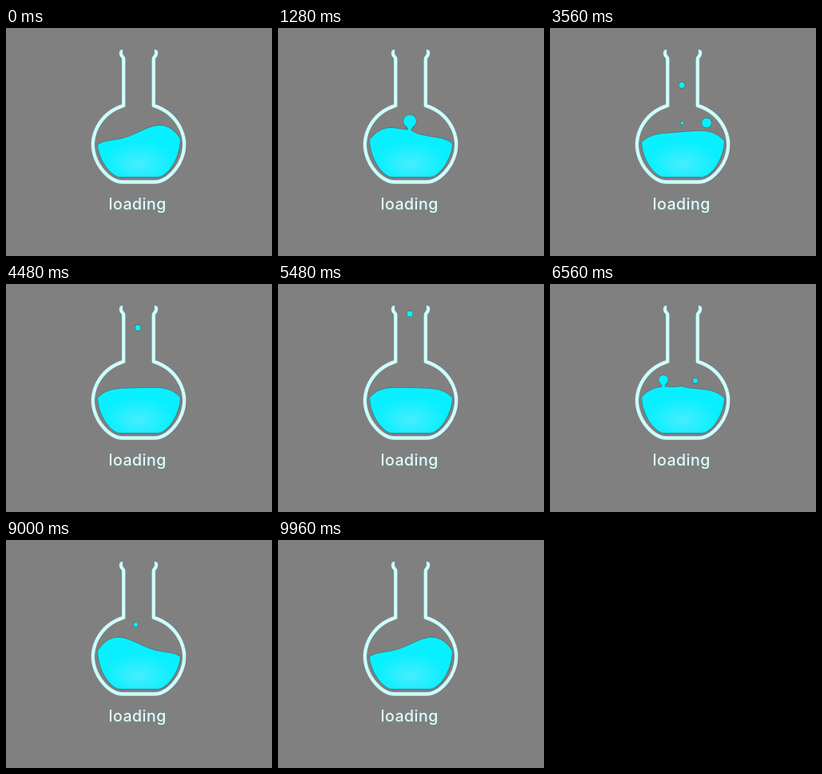
Write an HTML page with a canvas that moves like this. It is 333x285 px and loops after 10 s.

```html
<!DOCTYPE html>
<html lang="en">
<head>
<meta charset="utf-8">
<title>Loading</title>
<style>
html, body { margin: 0; width: 100%; height: 100%; overflow: hidden; background: #808080; }
canvas { display: block; }
</style>
</head>
<body>
<canvas id="stage" width="333" height="285"></canvas>
<script>
const ctx = document.getElementById('stage').getContext('2d');
const LOOP = 10;
const WAVE_PERIOD = 2;
const LEFT = 115, RIGHT = 218, MIDDLE = 166.5;

// x, radius, start time (s), rise speed, lifetime (s)
const bubbles = [
  [165, 3.5, 0.85, 30.5, 5.2],
  [165, 8, 0.89, 45, 2.5],
  [139, 5, 2.19, 30, 1.2],
  [196, 6, 2.98, 30, 1.4],
  [165.5, 3.5, 3.0, 30, 0.78],
  [142, 5.8, 6.03, 30, 1.3],
  [182, 3, 6.07, 30, 1.3],
  [165, 4, 6.43, 30, 1.2],
  [141, 3.5, 7.55, 28.5, 1.3],
  [162.5, 5, 7.91, 30, 1.3]
].map(([x, r, start, speed, life]) => ({ x, r, start, speed, life }));

const glow = ctx.createRadialGradient(0, 0, 0, 0, 0, 1);
glow.addColorStop(0, 'rgba(70, 236, 255, 1)');
glow.addColorStop(1, 'rgba(70, 236, 255, 0)');

function liveBubbles(time) {
  return bubbles.flatMap(b => {
    const age = time - b.start;
    if (age <= 0 || age >= b.life) return [];
    const scale = Math.min(1, (b.life - age) / 0.4);
    return [{ x: b.x, y: 138 - b.speed * age ** 0.78, r: b.r * scale, age }];
  });
}

function surfaceY(x, tilt, live) {
  const u = x - MIDDLE;
  const level = 130 + 12 * (Math.abs(u) / 51.5) ** 4.5;
  let y = level - 8.8 * tilt * Math.sin(Math.PI * u / 60);
  for (const b of live) {
    const pull = Math.max(0, 1 - b.age / 0.6) * Math.min(1, b.age / 0.1);
    y -= 0.45 * b.r * pull * Math.exp(-(((x - b.x) / 7) ** 2));
  }
  return y;
}

function liquidPath(tilt, live) {
  const path = new Path2D();
  const leftY = surfaceY(LEFT, tilt, live);
  path.moveTo(LEFT, leftY);
  for (let x = LEFT + 1; x <= RIGHT; x++) path.lineTo(x, surfaceY(x, tilt, live));
  path.bezierCurveTo(RIGHT, 161, 203, 186, 190, 186);
  path.lineTo(143, 186);
  path.bezierCurveTo(130, 186, LEFT, 161, LEFT, leftY);
  path.closePath();
  return path;
}

function bubblePath(b) {
  const path = new Path2D();
  path.arc(b.x, b.y, b.r, 0, 2 * Math.PI);
  return path;
}

// Thread that still ties a large young bubble to the liquid
function tailPath(b, tilt, live) {
  const path = new Path2D();
  const base = surfaceY(b.x, tilt, live) + 1;
  const top = b.y + b.r * 0.65;
  const half = b.r * 0.75;
  path.moveTo(b.x - half, top);
  path.quadraticCurveTo(b.x - 0.5, (top + base) / 2, b.x - 2.5, base);
  path.lineTo(b.x + 2.5, base);
  path.quadraticCurveTo(b.x + 0.5, (top + base) / 2, b.x + half, top);
  path.closePath();
  return path;
}

function drawGlow(clipPath) {
  ctx.save();
  ctx.clip(clipPath);
  ctx.translate(MIDDLE, 169);
  ctx.scale(44, 27);
  ctx.fillStyle = glow;
  ctx.fillRect(-1, -1, 2, 2);
  ctx.restore();
}

function drawLiquid(time) {
  const tilt = Math.cos(2 * Math.PI * time / WAVE_PERIOD);
  const live = liveBubbles(time);
  const body = liquidPath(tilt, live);
  const shapes = [body, ...live.map(bubblePath)];
  for (const b of live) {
    if (b.r > 4 && b.age < 0.55) shapes.push(tailPath(b, tilt, live));
  }
  ctx.strokeStyle = 'rgba(0, 85, 95, 0.5)';
  ctx.lineWidth = 1.2;
  shapes.forEach(shape => ctx.stroke(shape));
  ctx.fillStyle = '#08f0ff';
  shapes.forEach(shape => ctx.fill(shape));
  drawGlow(body);
}

function drawFlaskHalf(side) {
  const angle = degrees => degrees * Math.PI / 180;
  ctx.save();
  ctx.translate(166, 0);
  ctx.scale(side, 1);
  ctx.beginPath();
  ctx.moveTo(-20, 29);
  ctx.bezierCurveTo(-23, 29, -22.5, 34, -20, 36);
  ctx.quadraticCurveTo(-18.8, 37, -18.8, 40);
  ctx.lineTo(-18.8, 97);
  ctx.ellipse(0, 146, 57, 52, 0, angle(250.8), angle(145), true);
  ctx.bezierCurveTo(-38.8, 186, -30, 192.5, -20, 192.5);
  ctx.lineTo(0.5, 192.5);
  ctx.stroke();
  ctx.restore();
}

function drawFlask() {
  ctx.strokeStyle = '#ccffff';
  ctx.lineWidth = 4.3;
  ctx.lineJoin = 'round';
  drawFlaskHalf(1);
  drawFlaskHalf(-1);
}

function drawLabel() {
  ctx.fillStyle = '#dcffff';
  ctx.font = '500 19.5px Inter, Lato, sans-serif';
  ctx.letterSpacing = '0.5px';
  ctx.fillText('loading', 128.5, 227);
}

function draw(now) {
  const time = now / 1000 % LOOP;
  ctx.fillStyle = '#808080';
  ctx.fillRect(0, 0, 333, 285);
  drawLiquid(time);
  drawFlask();
  drawLabel();
}

let origin;
function tick(now) {
  origin ??= now;
  draw(now - origin);
  requestAnimationFrame(tick);
}
draw(0);
requestAnimationFrame(tick);
</script>
</body>
</html>
```
